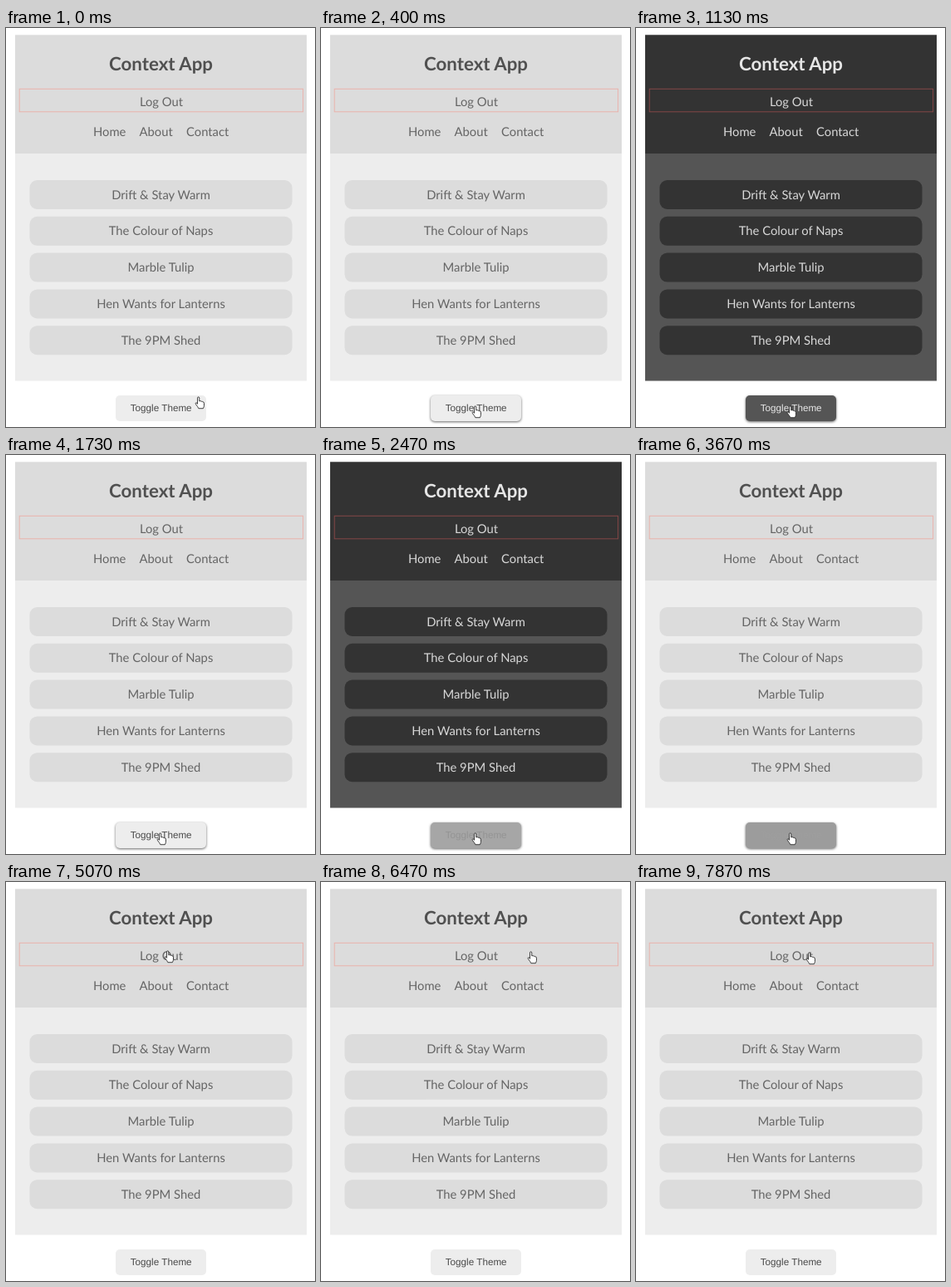
Animation, 372 px wide and 480 px high, one loop 8 s. Source, as an HTML page:

```html
<!DOCTYPE html>
<html lang="en">
<head>
<meta charset="utf-8">
<title>Context App</title>
<style>
  html, body { margin: 0; width: 100%; height: 100%; overflow: hidden; background: #fff; }
  svg { display: block; --card: #dcdcdc; --page: #ededed; --text: #656565; --title: #505050; --line: #eab2ac; }
  svg.dark { --card: #333; --page: #555; --text: #d8d8d8; --title: #e6e6e6; --line: #844646; }
  text { font: 14.8px Lato, sans-serif; fill: var(--text); text-anchor: middle; text-rendering: geometricPrecision; }
  .card { fill: var(--card); }
  #label { font: 11.7px "Liberation Sans", Arial, sans-serif; }
</style>
</head>
<body>
<svg id="stage" width="372" height="480" viewBox="0 0 372 480">
  <rect x="11" y="8.5" width="351" height="416" fill="var(--page)"/>
  <rect class="card" x="11" y="8.5" width="351" height="142.5"/>
  <text x="186.5" y="51" style="font-size:22.3px;font-weight:700;fill:var(--title)">Context App</text>
  <rect x="16.2" y="73.3" width="341.4" height="27.5" fill="none" stroke="var(--line)"/>
  <text x="187" y="93.5">Log Out</text>
  <text x="124.7" y="129.5">Home</text>
  <text x="180.7" y="129.5">About</text>
  <text x="242.7" y="129.5">Contact</text>
  <g id="books"></g>
  <rect id="button" x="132" y="442" width="109" height="31" rx="5"/>
  <text id="label" x="186.7" y="461.3">Toggle Theme</text>
  <g id="hand">
    <path transform="translate(.6 .5) scale(.92 .98)" fill="#fff" stroke="#222" stroke-width=".9" stroke-linejoin="round" d="M3.2 9V1.6a1.2 1.2 0 0 1 2.4 0V5.5q2-.8 2.6.4 1.6-.5 2 .6 1.6 0 1.6 1.4V11q0 1.5-1.2 3.5H4.6Q3.8 12.5 1 9.4.2 8 1.2 7.4q.9-.3 2 1.6z"/>
  </g>
</svg>
<script>
const [stage, books, button, label, hand] =
  ["stage", "books", "button", "label", "hand"].map(id => document.getElementById(id));

const titles = ["Drift & Stay Warm", "The Colour of Naps", "Marble Tulip",
  "Hen Wants for Lanterns", "The 9PM Shed"];
books.innerHTML = titles.map((title, i) => {
  const y = 183 + 43.8 * i;
  return `<rect class="card" x="28.5" y="${y}" width="316" height="35" rx="9"/>
    <text x="186.5" y="${y + 22.5}">${title.replace("&", "&amp;")}</text>`;
}).join("");

// Time is counted in steps of 1/15 s.
const FPS = 15, STEPS = 120;
const pointer = [ // step, x, y
  [0, 227, 443], [6, 181, 454], [58, 181, 454], [69, 130, 80], [75, 130, 80],
  [76, 190, 82], [77, 236, 83], [78, 248, 83], [107, 248, 83], [113, 204, 84], [STEPS, 204, 84]
];
const toggles = [ // step, button blend on that step, blend per step
  [15, .18, .6], [25, .47, .6], [37, .47, .6], [55, .47, .6]
];

const clamp = v => Math.min(1, Math.max(0, v));
const mix = (a, b, k) => a + (b - a) * k;
const grey = v => `rgb(${v},${v},${v})`;

function pointerAt(step) {
  const i = pointer.findIndex(p => p[0] > step);
  const [s0, x0, y0] = pointer[i - 1], [s1, x1, y1] = pointer[i];
  const k = (step - s0) / (s1 - s0), eased = k * k * (3 - 2 * k);
  return [mix(x0, x1, eased), mix(y0, y1, eased)];
}

function draw(step) {
  const done = toggles.filter(t => t[0] <= step);
  const dark = done.length % 2 === 1;
  stage.classList.toggle("dark", dark);

  let darkness = 0;
  if (done.length) {
    const [at, first, rate] = done[done.length - 1];
    const blend = clamp(first + (step - at) * rate);
    darkness = dark ? blend : 1 - blend;
  }
  button.style.fill = grey(mix(237, 85, darkness));
  label.style.fill = grey(mix(74, 232, darkness));

  const hover = clamp(step / 4) * clamp((64 - step) / 4);
  button.style.filter = hover ? `drop-shadow(0 1.5px 1.5px rgba(0,0,0,${.6 * hover}))` : "none";
  hand.setAttribute("transform", `translate(${pointerAt(step)})`);
}

const start = performance.now();
function tick() {
  const ms = performance.now() - start + 5;
  draw(Math.floor(ms * FPS / 1000) % STEPS);
  requestAnimationFrame(tick);
}
tick();
</script>
</body>
</html>
```
